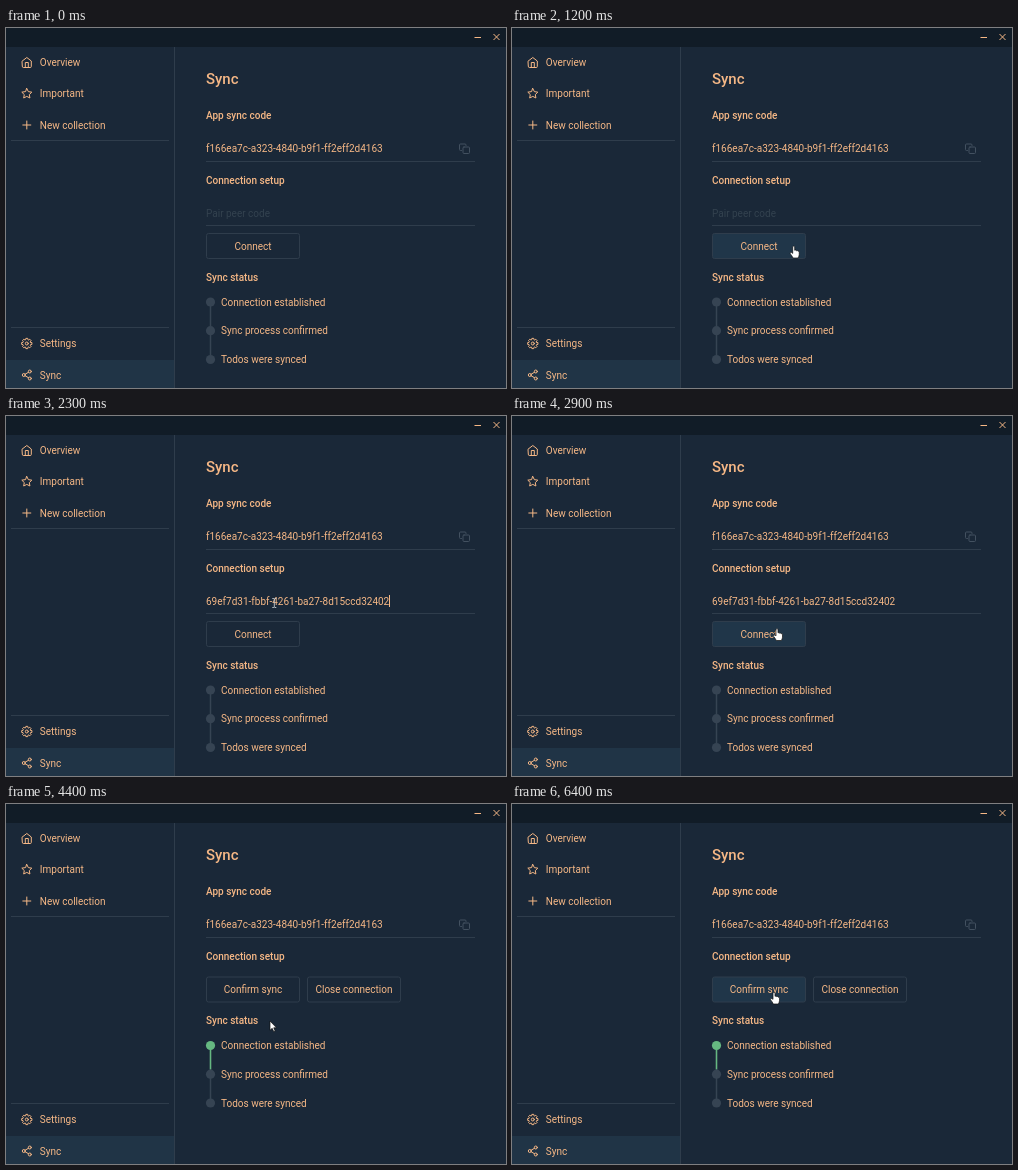
These frames come from a looping animation (500x360 px, 8 s). An HTML page:

```html
<!DOCTYPE html>
<html lang="en">
<head>
<meta charset="utf-8">
<title>Sync</title>
<style>
  html, body { margin: 0; width: 100%; height: 100%; overflow: hidden; background: #1a2838; }
  svg { display: block; }
  text { font: 10px Roboto, sans-serif; fill: #f6b886; }
  .head { font-weight: 500; }
  .title { font-size: 15px; font-weight: 500; }
  .mid { text-anchor: middle; }
  .rule { stroke: #2f3d4c; fill: none; }
  .icon { fill: none; stroke: #f6b886; stroke-width: 2; stroke-linecap: round; stroke-linejoin: round; }
  .button rect { width: 93px; height: 25px; rx: 2px; fill: #1a2838; stroke: #2f3d4c; }
  .button.hover rect { fill: #203649; }
  .pointer { stroke: #111; stroke-width: .7; fill: #fff; stroke-linejoin: round; }
</style>
</head>
<body>
<svg width="500" height="360" viewBox="0 0 500 360">
  <rect width="500" height="360" fill="#1a2838"/>
  <rect width="500" height="19" fill="#111c27"/>
  <rect y="332" width="168" height="28" fill="#203446"/>
  <path class="rule" d="M168.5 19V360M5 112.5H163M5 299.5H163M200 133.5H469"/>
  <path d="M468.5 9.5h6.5M487.5 6l6 6m0-6l-6 6" stroke="#f6b886" fill="none"/>

  <g class="icon">
    <g transform="translate(14.8 28.5) scale(.5)"><path d="M3 9l9-7 9 7v11a2 2 0 0 1-2 2H5a2 2 0 0 1-2-2zM9 22V12h6v10"/></g>
    <g transform="translate(14.8 59.5) scale(.5)"><path d="M12 2l3.1 6.3 6.9 1-5 4.9 1.2 6.8L12 17.8 5.8 21 7 14.2 2 9.300l6.900-1z"/></g>
    <g transform="translate(14.8 91) scale(.5)"><path d="M12 4v16M4 12h16"/></g>
    <g transform="translate(14.8 309.5) scale(.5)"><circle cx="12" cy="12" r="3"/><path id="gear"/></g>
    <g transform="translate(14.8 341) scale(.5)">
      <circle cx="18" cy="5" r="3"/><circle cx="6" cy="12" r="3"/><circle cx="18" cy="19" r="3"/>
      <path d="M8.600 13.500l6.800 4M15.400 6.500l-6.800 4"/>
    </g>
    <g transform="translate(453 115) scale(.5)" stroke="#435160"><rect x="8" y="8" width="13" height="13" rx="2"/><path d="M5 15H3a2 2 0 0 1-2-2V4a2 2 0 0 1 2-2h9a2 2 0 0 1 2 2v1"/></g>
  </g>

  <text x="33.800" y="38">Overview</text>
  <text x="33.800" y="69">Important</text>
  <text x="33.800" y="100.500">New collection</text>
  <text x="33.800" y="319">Settings</text>
  <text x="33.800" y="350.500">Sync</text>

  <text class="title" x="200" y="56">Sync</text>
  <text class="head" x="200" y="91">App sync code</text>
  <text x="200" y="124">f166ea7c-a323-4840-b9f1-ff2eff2d4163</text>
  <text class="head" x="200" y="155.500">Connection setup</text>

  <g id="pairing">
    <text id="peer" x="200" y="188.500"></text>
    <path id="caret" d="M383.500 179v12" stroke="#f6b886"/>
    <path class="rule" d="M200 197.500H469"/>
    <g class="button" id="connect"><rect x="200.500" y="205.500"/><text class="mid" x="247" y="221.500">Connect</text></g>
  </g>
  <g id="paired">
    <g class="button" id="confirm"><rect x="200.500" y="173"/><text class="mid" x="247" y="189">Confirm sync</text></g>
    <g class="button"><rect x="301.500" y="173"/><text class="mid" x="348" y="189">Close connection</text></g>
  </g>

  <g id="status">
    <text class="head" x="200" y="252.500">Sync status</text>
    <path d="M204.500 274V331" stroke="#364453" stroke-width="1.500"/>
    <path id="link" d="M204.500 274V298" stroke="#65b881" stroke-width="1.500"/>
    <g fill="#364453">
      <circle id="dot" cx="204.500" cy="274" r="4.600"/>
      <circle cx="204.500" cy="302.700" r="4.600"/>
      <circle cx="204.500" cy="331.500" r="4.600"/>
    </g>
    <text x="215" y="277.500">Connection established</text>
    <text x="215" y="306.200">Sync process confirmed</text>
    <text x="215" y="335">Todos were synced</text>
  </g>

  <g id="cursor">
    <path id="arrow" class="pointer" d="M0 0V9.300L2.200 7.300 3.700 10.600 5.200 9.900 3.700 6.800H6.500Z"/>
    <path id="beam" d="M-2-4.500H-.500L0-4 .500-4.500H2M0-4V4M-2 4.500H-.500L0 4 .500 4.500H2" stroke="#c9cdd1" stroke-width=".9" fill="none"/>
    <path id="hand" class="pointer" d="M-1 .800Q0-.600 1 .800V4.300Q2.200 3.600 2.700 4.700 3.700 4.100 4.200 5.200 5.500 4.800 5.500 6.200V8.700Q5.300 10.300 4.400 12H-.700Q-1.600 9.900-3.500 7.700-3.500 5.800-1.900 6.600L-1 7.400Z"/>
  </g>
</svg>
<script>
const LOOP = 8000, STEP = 100, PASTED = 2200, CONNECTED = 4400;
const $ = id => document.getElementById(id);
const show = (id, on) => $(id).style.display = on ? '' : 'none';

// time, x, y of the pointer tip
const path = [
  [800, 350, 288], [900, 293.5, 240.5], [1600, 266, 188], [2000, 268.3, 187],
  [2700, 268.3, 187], [2900, 265, 212.5], [3200, 264, 217], [6000, 264, 217], [6400, 262, 188]
];

function pointerAt(t) {
  const i = path.findIndex(p => p[0] > t);
  if (i < 0) return path[path.length - 1].slice(1);
  if (i === 0) return path[0].slice(1);
  const [t0, x0, y0] = path[i - 1], [t1, x1, y1] = path[i];
  const k = (t - t0) / (t1 - t0);
  return [x0 + (x1 - x0) * k, y0 + (y1 - y0) * k];
}

function gearOutline() {
  const points = [];
  for (let i = 0; i < 8; i++)
    for (const [turn, r] of [[-.3, 7.8], [-.18, 10.4], [.18, 10.4], [.3, 7.8]]) {
      const a = i * Math.PI / 4 + turn;
      points.push((12 + r * Math.cos(a)).toFixed(2) + ' ' + (12 + r * Math.sin(a)).toFixed(2));
    }
  return 'M' + points.join('L') + 'Z';
}

function render(t) {
  const paired = t >= CONNECTED, pasted = t >= PASTED;
  const [x, y] = pointerAt(t);
  const inside = (left, top, right, bottom) => t >= 800 && x >= left && x <= right && y >= top && y <= bottom;
  const onConnect = !paired && inside(200, 205, 294, 231);
  const onConfirm = paired && inside(200, 173, 294, 198);
  const onField = !paired && inside(200, 173, 469, 198);

  show('pairing', !paired);
  show('paired', paired);
  show('link', paired);
  $('dot').style.fill = paired ? '#65b881' : '';
  $('status').setAttribute('transform', `translate(0 ${paired ? -32.5 : 0})`);
  $('peer').textContent = pasted ? '69ef7d31-fbbf-4261-ba27-8d15ccd32402' : 'Pair peer code';
  $('peer').style.fill = pasted ? '' : '#33424f';
  show('caret', pasted && t < 2700 || t >= 3200 && t < 3500);
  $('connect').classList.toggle('hover', onConnect);
  $('confirm').classList.toggle('hover', onConfirm);

  show('cursor', t >= 800);
  $('cursor').setAttribute('transform', `translate(${x} ${y})`);
  show('hand', onConnect || onConfirm);
  show('beam', onField);
  show('arrow', !onConnect && !onConfirm && !onField);
}

function tick() {
  render(Math.floor(performance.now() % LOOP / STEP) * STEP);
  requestAnimationFrame(tick);
}

$('gear').setAttribute('d', gearOutline());
tick();
</script>
</body>
</html>
```
